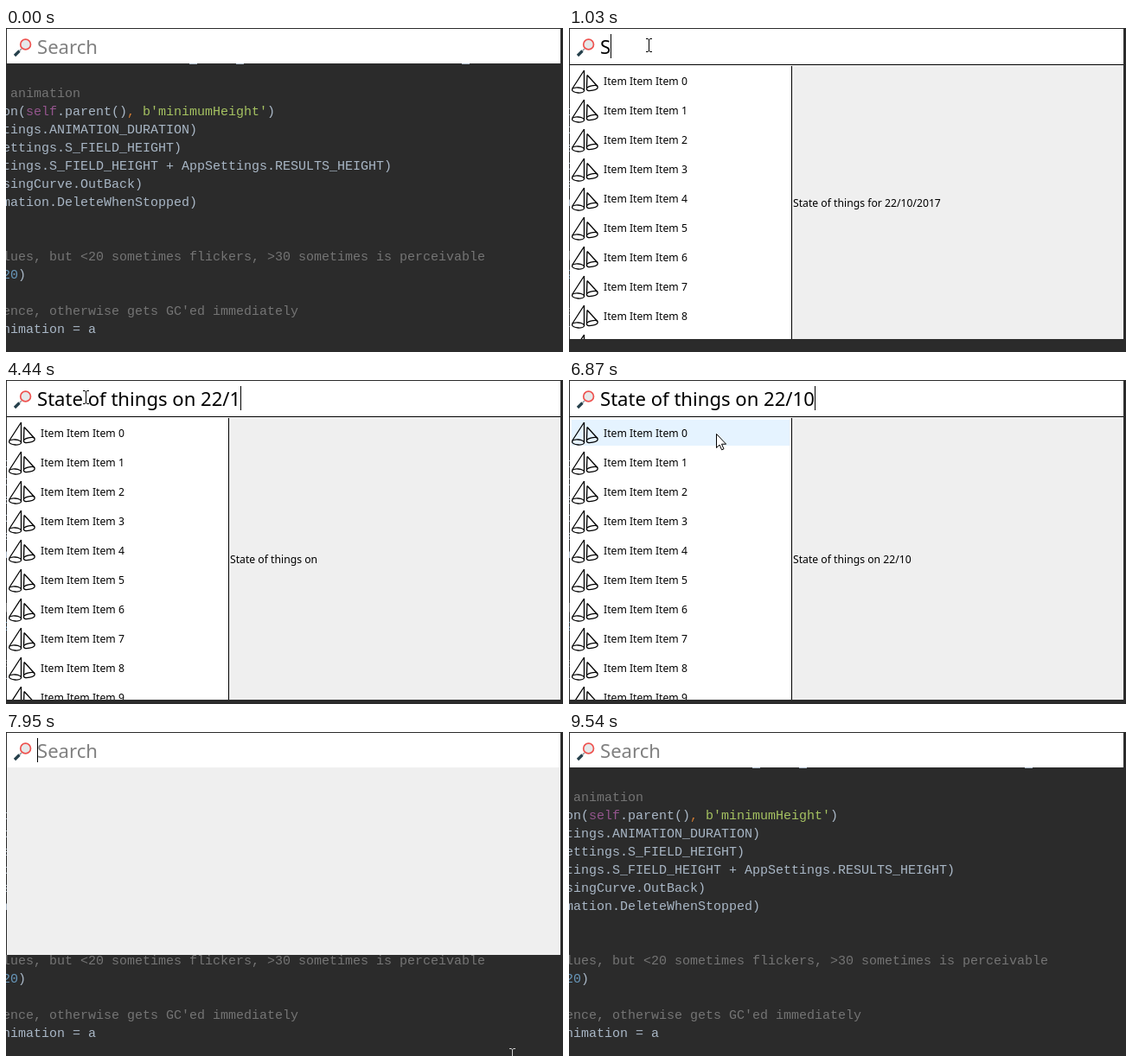
An HTML page for the animation above (9630 ms loop, 644 by 375 pixels).

```html
<!DOCTYPE html>
<html lang="en">
<head>
<meta charset="utf-8">
<title>Search box</title>
<style>
html, body { margin: 0; width: 100%; height: 100%; overflow: hidden; background: #2b2b2b; }
svg { display: block; }
text { white-space: pre; }
.code { font: 15px "Liberation Mono", monospace; fill: #a9b7c6; }
.note { fill: #747474; }
.self { fill: #94558d; }
.comma { fill: #cc7832; }
.bytes { fill: #a5c261; }
.num { fill: #6897bb; }
.big { font: 22.1px "Noto Sans", sans-serif; }
.small { font: 12.2px "Noto Sans", sans-serif; }
.ibeam { mix-blend-mode: difference; }
</style>
</head>
<body>
<svg width="644" height="375" viewBox="0 0 644 375">
  <defs>
    <g id="cones" fill="none" stroke="#000" stroke-width="1.3">
      <path d="M17.5 49L3.6 70.5M17.5 49V72M21 54.5L20.5 69.5M21 54.5L33 67.5"/>
      <ellipse cx="10.6" cy="72" rx="7" ry="3" transform="rotate(4 10.6 72)"/>
      <ellipse cx="26.8" cy="69.5" rx="6.5" ry="2.8" transform="rotate(-12 26.8 69.5)"/>
    </g>
    <clipPath id="clip"><rect id="clipBox" x="1" y="1" width="640"/></clipPath>
  </defs>
  <rect width="644" height="375" fill="#2b2b2b"/>
  <g id="code" class="code">
    <path d="M212 41.5h9M266 41.5h9M527 41.5h9" stroke="#a9b7c6"/>
  </g>
  <g clip-path="url(#clip)">
    <rect x="1" y="1" width="640" height="374" fill="#efefef"/>
    <rect x="1" y="1" width="640" height="40" fill="#fff"/>
    <g id="results">
      <rect x="1" y="41" width="256" height="334" fill="#fff"/>
      <rect x="257" y="41" width="384" height="1" fill="#fff"/>
      <rect id="hover" x="3" y="46" width="252" height="30" fill="#e5f3ff"/>
      <g id="items" class="small"></g>
      <path d="M1 42.5H641M257.5 44V375" stroke="#000"/>
      <text id="label" class="small" x="259"></text>
    </g>
    <path d="M18 24L15.5 26.5" stroke="#8a9499" stroke-width="1.5"/>
    <path d="M15.5 26.5L10 32" stroke="#243f4a" stroke-width="3.2"/>
    <circle cx="22.6" cy="19" r="5.9" fill="#e6e9ea" stroke="#ee5350" stroke-width="1.7"/>
    <text id="query" class="big" x="36" y="30"></text>
    <rect id="caret" y="7" width="1" height="28"/>
  </g>
  <path id="ibeam" class="ibeam" d="M-3 -7.5H-1L.5 -6.5L2 -7.5H4M.5 -6.5V6.5M-3 7.5H-1L.5 6.5L2 7.5H4" fill="none" stroke="#fff"/>
  <path id="arrow" d="M.5 .5V16.5L4 13L6.6 18.8L9 17.8L6.5 12.2H11.6Z" fill="#fff" stroke="#000"/>
</svg>
<script>
const LOOP = 9630;
const $ = id => document.getElementById(id);
const show = (el, on) => el.setAttribute('visibility', on ? 'visible' : 'hidden');
const place = (el, [x, y]) => el.setAttribute('transform', `translate(${Math.round(x)} ${Math.round(y)})`);
const span = (kind, s) => `<tspan class="${kind}">${s}</tspan>`;

const lines = [
  [80, span('note', ' animation')],
  [101, `on(${span('self', 'self')}.parent()${span('comma', ',')} ${span('bytes', "b'minimumHeight'")})`],
  [122, 'tings.ANIMATION_DURATION)'],
  [143, 'ettings.S_FIELD_HEIGHT)'],
  [164, 'tings.S_FIELD_HEIGHT + AppSettings.RESULTS_HEIGHT)'],
  [185, 'singCurve.OutBack)'],
  [206, 'mation.DeleteWhenStopped)'],
  [269, span('note', 'lues, but &lt;20 sometimes flickers, &gt;30 sometimes is perceivable')],
  [290, `${span('num', '20')})`],
  [332, span('note', "ence, otherwise gets GC'ed immediately")],
  [353, 'nimation = a'],
];
$('code').innerHTML += lines.map(([y, s]) => `<text x="-4" y="${y}">${s}</text>`).join('');
$('items').innerHTML = Array.from({ length: 10 }, (_, i) =>
  `<g transform="translate(0 ${34 * i})"><use href="#cones"/><text x="40" y="66">Item Item Item ${i}</text></g>`).join('');

const phrase = 'State of things on 22/10';
const keyTimes = [
  930, 1150, 1340, 1440, 1540, 1640,
  ...Array.from({ length: 9 }, (_, i) => 2180 + 75 * i), 2970,
  3650, 3730, 3810, 4040, 4220, 4360, 4440, 4590,
];
const CLEARED = 7720;

// Each list holds [start time, value]; the value stays until the next start.
const heights = [[0, 41], [930, 150], [980, 300], [1030, 360], [1080, 370], [7950, 258], [8000, 110], [8040, 41]];
const labels = [
  [0, 'State of things for 22/10/2017'], [1110, 'S'], [1340, 'St'], [1730, 'State'],
  [2480, 'State of'], [3000, 'State of things'], [3930, 'State of things on'], [4770, phrase],
];
const carets = [[0, false], [520, true], [5180, false], [5730, true], [6240, false], [6700, true], [8490, false], [9030, true], [9540, false]];
const at = (list, t) => list.filter(([start]) => start <= t).pop()[1];

const mix = (a, b, p) => a.map((v, i) => v + (b[i] - v) * p);
const smooth = p => p * p * (3 - 2 * p);
const FIELD = [92, 20], ITEM = [170, 62], EDITOR = [585, 374];

function mouse(t) {
  if (t < 30 || t >= 8900) return null;
  if (t < 6700) {
    const step = Math.min(5, Math.floor((t - 30) / 54));
    return mix([499, 364], FIELD, smooth(step / 5));
  }
  const step = Math.min(13, Math.floor((t - 6700) / 42.5) + 0.001);
  return step < 4.01 ? mix(FIELD, ITEM, Math.min(1, (step + 0.4) / 4.4))
                     : mix(ITEM, EDITOR, smooth(Math.min(1, (step - 4) / 9)));
}

function render(t) {
  const bottom = at(heights, t);
  const open = t >= 930 && t < 7950;
  $('clipBox').setAttribute('height', bottom - 1);
  show($('results'), open);

  const typed = t < CLEARED ? phrase.slice(0, keyTimes.filter(k => k <= t).length) : '';
  const query = $('query');
  query.textContent = typed || 'Search';
  query.setAttribute('fill', typed ? '#000' : '#808080');
  $('caret').setAttribute('x', 36 + (typed ? Math.round(query.getComputedTextLength()) : 0));
  show($('caret'), at(carets, t));

  $('label').textContent = at(labels, t);
  $('label').setAttribute('y', Math.round((43 + bottom) / 2 + 5.5));

  const pos = mouse(t);
  const [x, y] = pos || [0, 0];
  const arrow = open && y > 42 && y < 370 && x < 641;
  show($('arrow'), pos && arrow);
  show($('ibeam'), pos && !arrow);
  place($('arrow'), [x, y]);
  place($('ibeam'), [x, y]);

  const row = Math.floor((y - 44) / 34);
  show($('hover'), arrow && x < 256 && row >= 0);
  $('hover').setAttribute('y', 46 + 34 * row);
}

const start = performance.now();
function tick() {
  render((performance.now() - start) % LOOP);
  requestAnimationFrame(tick);
}
tick();
</script>
</body>
</html>
```
